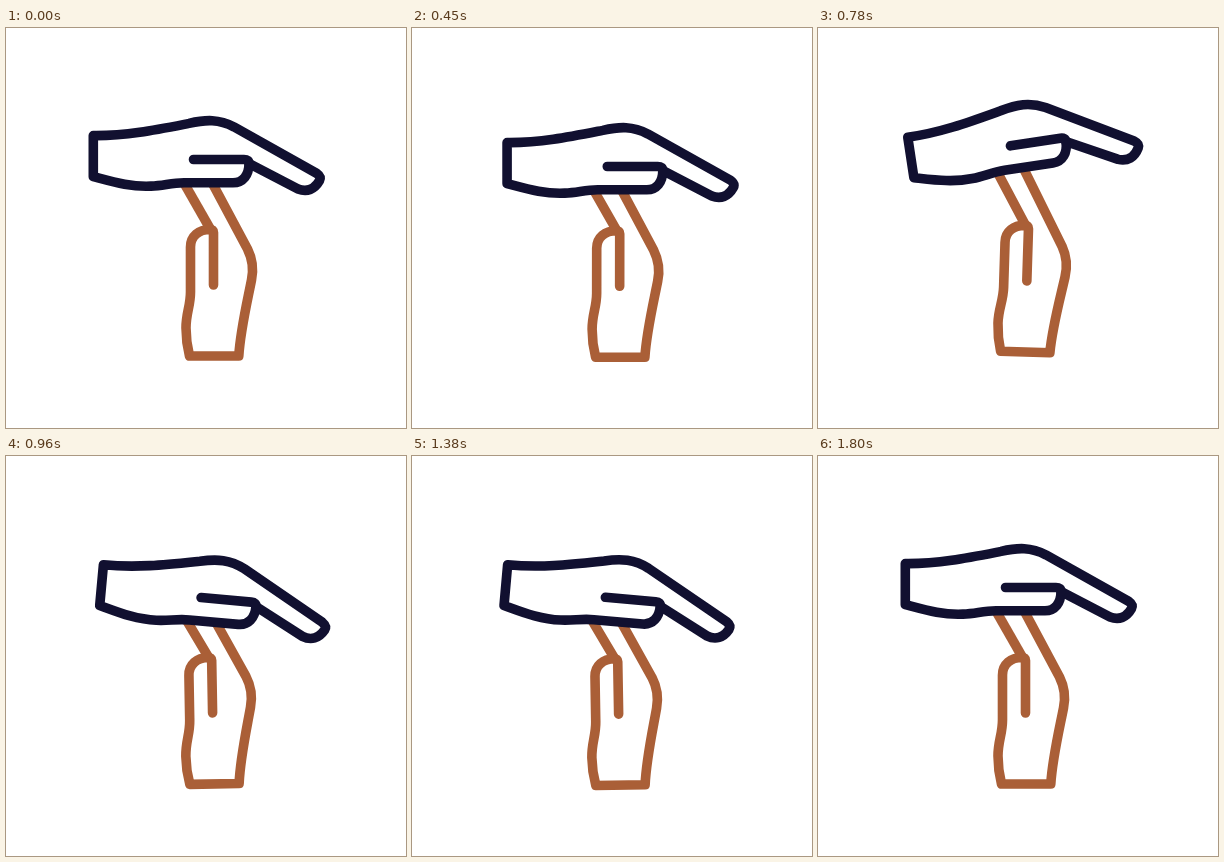
An HTML page that plays this animation: 400x400 px, repeating every 1830 ms.

```html
<!DOCTYPE html>
<html lang="en">
<head>
<meta charset="utf-8">
<title>Time-out hands</title>
<style>
  html, body { margin: 0; width: 100%; height: 100%; overflow: hidden; background: #fff; }
  svg { display: block; width: 100%; height: 100%; }
  path { fill: none; stroke-width: 9.6; stroke-linecap: round; stroke-linejoin: round; }
  #lower path { stroke: #aa5f37; }
  #upper path { stroke: #111030; }
  #upper .body { fill: #fff; }
</style>
</head>
<body>
<svg viewBox="0 0 400 400">
  <g id="lower">
    <path d="M166 134 L204 200.5"/>
    <path d="M207.5 257 V204.5 Q207.5 201.5 204 201.5 C193 201.5 184.5 208 184.5 219 V264
      C184.5 278 180 285 180 300 C180 312 181 318 183.5 328 H232.8
      C234.3 303 241 275 245.5 252 C248 240 246 230 241.5 221 L195 134"/>
  </g>
  <g id="upper">
    <path class="body" d="M87.3 107.6 C121 108 152 101.5 183 95.4 C200 91.5 213 91 228 98.9
      L310.5 145.2 Q315.5 148.7 313.5 152.7 C308.5 161.5 301 164.5 292 161 L243 135.5
      C243 147 237 154.8 227 154.8 H178 C165 154.8 158 157.6 145 158.1 C125 159.1 108 154 87.3 148.5 Z"/>
    <path d="M187.5 131.5 H238 Q243 131.5 243 135.5"/>
  </g>
</svg>
<script>
const LOOP = 1830, STEP = 30, PERIOD = 420, SETTLE = 270;
const upper = document.getElementById('upper');
const lower = document.getElementById('lower');

// Rest -> first crest, two and a half swings, then ease back to rest.
function swing(t, rest, mean, amp, crest) {
  const last = crest + PERIOD * 2.5;
  if (t < crest) {
    const k = (1 - Math.cos(Math.PI * t / crest)) / 2;
    return rest + (mean + amp - rest) * k;
  }
  if (t < last) return mean + amp * Math.cos(2 * Math.PI * (t - crest) / PERIOD);
  const k = Math.sin(Math.PI / 2 * Math.min(1, (t - last) / SETTLE));
  return mean - amp + (rest - mean + amp) * k;
}

function place(el, x, y, angle, px, py) {
  el.setAttribute('transform', `translate(${x} ${y}) rotate(${angle}) translate(${-px} ${-py})`);
}

function draw(t) {
  place(upper,
    swing(t, 187.5, 193.3, -2.4, 280),
    swing(t, 131.5, 127.2, -16.6, 295),
    swing(t, 0, -2.2, -7.4, 325),
    187.5, 131.5);
  place(lower,
    swing(t, 207.5, 207.1, -0.8, 300),
    swing(t, 328, 325, -4.7, 270),
    swing(t, 0, 0.5, 1.5, 325),
    207.5, 328);
}

const start = performance.now();
function tick() {
  const t = (performance.now() - start) % LOOP;
  draw(Math.floor(t / STEP) * STEP);
  requestAnimationFrame(tick);
}
tick();
</script>
</body>
</html>
```
